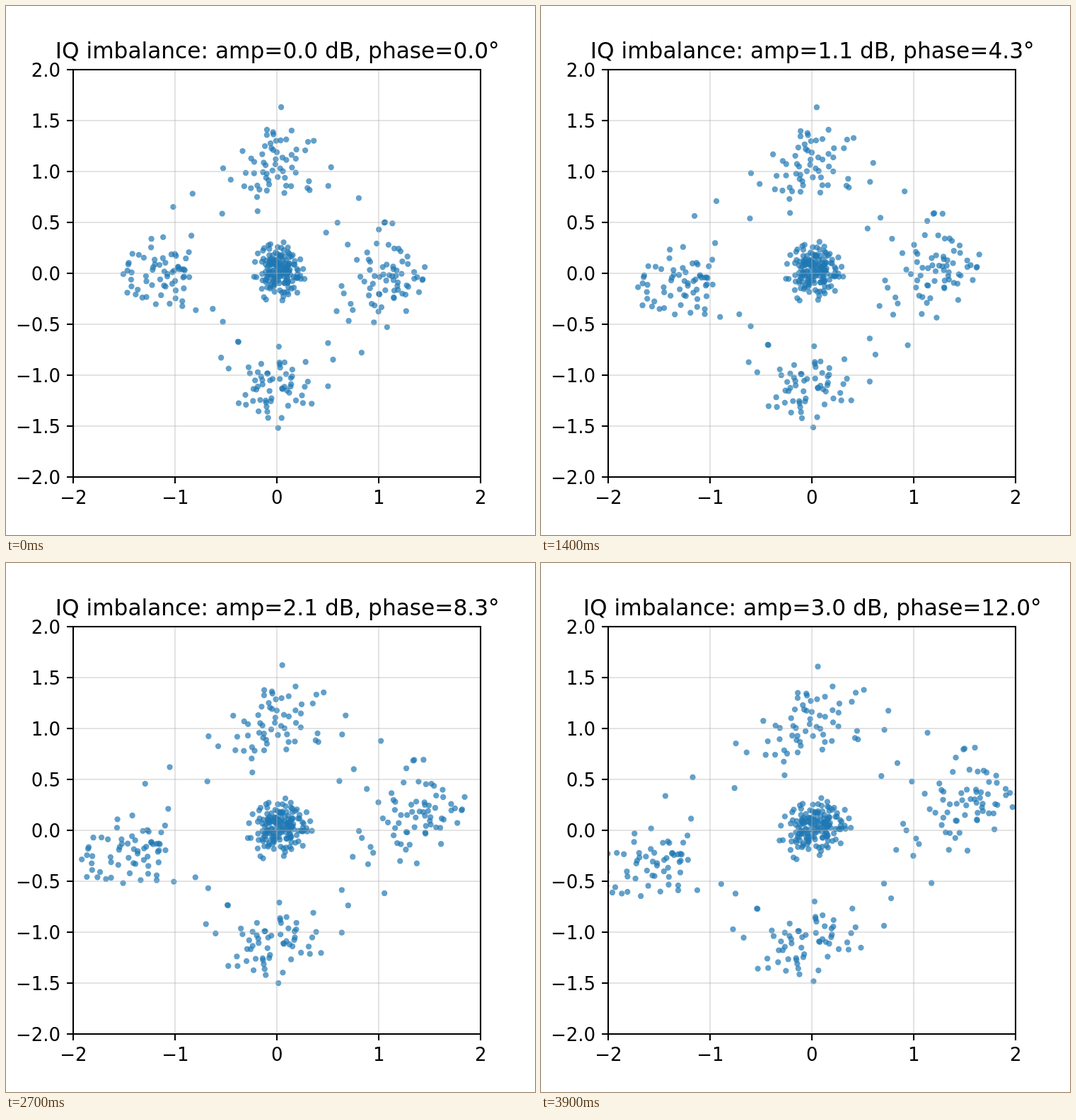
Animation, 748 px wide and 748 px high, one loop 4 s. Source, as an HTML page with a canvas:

```html
<!DOCTYPE html>
<html lang="en">
<head>
<meta charset="utf-8">
<title>IQ imbalance</title>
<style>
  html, body { margin: 0; width: 100%; height: 100%; overflow: hidden; background: #fff; }
  canvas { display: block; width: 748px; height: 748px; }
</style>
</head>
<body>
<canvas id="plot" width="748" height="748"></canvas>
<script>
const ctx = document.getElementById('plot').getContext('2d');
const STEPS = 40, STEP_MS = 100;
const CX = 383.35, CY = 377.74, UNIT = 144;
const LEFT = 95, RIGHT = 671, TOP = 90, BOTTOM = 666;
const FONT = '"DejaVu Sans", Verdana, sans-serif';

// Outermost samples, which set the outline of the cloud
const outline = [
  [.04, 1.63], [.36, 1.3], [.53, 1.04], [1.06, .5], [1.45, .06], [1.43, -.06],
  [1.08, -.53], [.83, -.78], [.5, -1.11], [.01, -1.52], [-.55, -.83],
  [-1.51, -.01], [-1.43, -.13], [-1.02, .65], [-.83, .78], [-.53, 1.03]
];

let seed = 20;
function rand() {
  seed = (seed * 1664525 + 1013904223) % 4294967296;
  return seed / 4294967296;
}
const spread = w => w * (2 * rand() - 1);
const sign = () => rand() < .5 ? -1 : 1;
// Bounded bell curve with the given deviation
const noise = sd => sd * (spread(1) + spread(1) + spread(1));

function makeSamples() {
  const out = [...outline];
  // u and v run along the diagonals, so the square of symbols stands on its tip
  const add = (u, v) => out.push([(u - v) * Math.SQRT1_2, (u + v) * Math.SQRT1_2]);
  const level = () => sign() * (.79 + noise(.16));
  for (let k = 0; k < 205; k++) add(level(), level());
  for (let k = 0; k < 44; k++) {
    const u = level(), v = spread(.65);
    k % 2 ? add(u, v) : add(v, u);
  }
  for (let k = 0; k < 160; k++) out.push([.02 + noise(.11), .02 + noise(.11)]);
  return out;
}
const samples = makeSamples();

function line(x1, y1, x2, y2) {
  ctx.beginPath();
  ctx.moveTo(x1, y1);
  ctx.lineTo(x2, y2);
  ctx.stroke();
}

function text(str, x, y, size, align) {
  ctx.font = size + 'px ' + FONT;
  ctx.textAlign = align;
  ctx.fillText(str, x, y);
}

const label = (v, digits) => (v < 0 ? '\u2212' : '') + Math.abs(v).toFixed(digits);

function drawSamples(amp, phase) {
  const gain = 10 ** (amp / 20), angle = phase * Math.PI / 180;
  const sin = Math.sin(angle), cos = Math.cos(angle);
  ctx.save();
  ctx.beginPath();
  ctx.rect(LEFT, TOP, RIGHT - LEFT, BOTTOM - TOP);
  ctx.clip();
  ctx.fillStyle = 'rgba(31, 119, 180, 0.7)';
  for (const [i, q] of samples) {
    const x = gain * i, y = q * cos + x * sin;
    ctx.beginPath();
    ctx.arc(CX + x * UNIT, CY - y * UNIT, 4.15, 0, 2 * Math.PI);
    ctx.fill();
  }
  ctx.restore();
}

function drawAxes() {
  ctx.lineWidth = 2.08;
  ctx.fillStyle = '#000';
  for (let v = -2; v <= 2; v += .5) {
    const y = Math.round(CY - v * UNIT), x = Math.round(CX + v * UNIT);
    const whole = v % 1 === 0;
    if (Math.abs(v) < 2) {
      ctx.strokeStyle = 'rgba(176, 176, 176, 0.35)';
      line(LEFT, y, RIGHT, y);
      if (whole) line(x, TOP, x, BOTTOM);
    }
    ctx.strokeStyle = '#000';
    line(LEFT - 9, y, LEFT, y);
    text(label(v, 1), 77, y + 10, 25.97, 'right');
    if (whole) {
      line(x, BOTTOM, x, BOTTOM + 9);
      text(label(v, 0), CX + v * UNIT, 704, 25.97, 'center');
    }
  }
  ctx.strokeRect(LEFT, TOP, RIGHT - LEFT, BOTTOM - TOP);
}

function draw(step) {
  const t = step / (STEPS - 1), amp = 3 * t, phase = 12 * t;
  ctx.fillStyle = '#fff';
  ctx.fillRect(0, 0, 748, 748);
  drawSamples(amp, phase);
  drawAxes();
  text(`IQ imbalance: amp=${amp.toFixed(1)} dB, phase=${phase.toFixed(1)}°`, CX + .4, 74, 31.22, 'center');
}

const start = performance.now();
let shown = -1;
function tick() {
  const step = Math.floor((performance.now() - start) / STEP_MS) % STEPS;
  if (step !== shown) draw(shown = step);
  requestAnimationFrame(tick);
}
tick();
</script>
</body>
</html>
```
